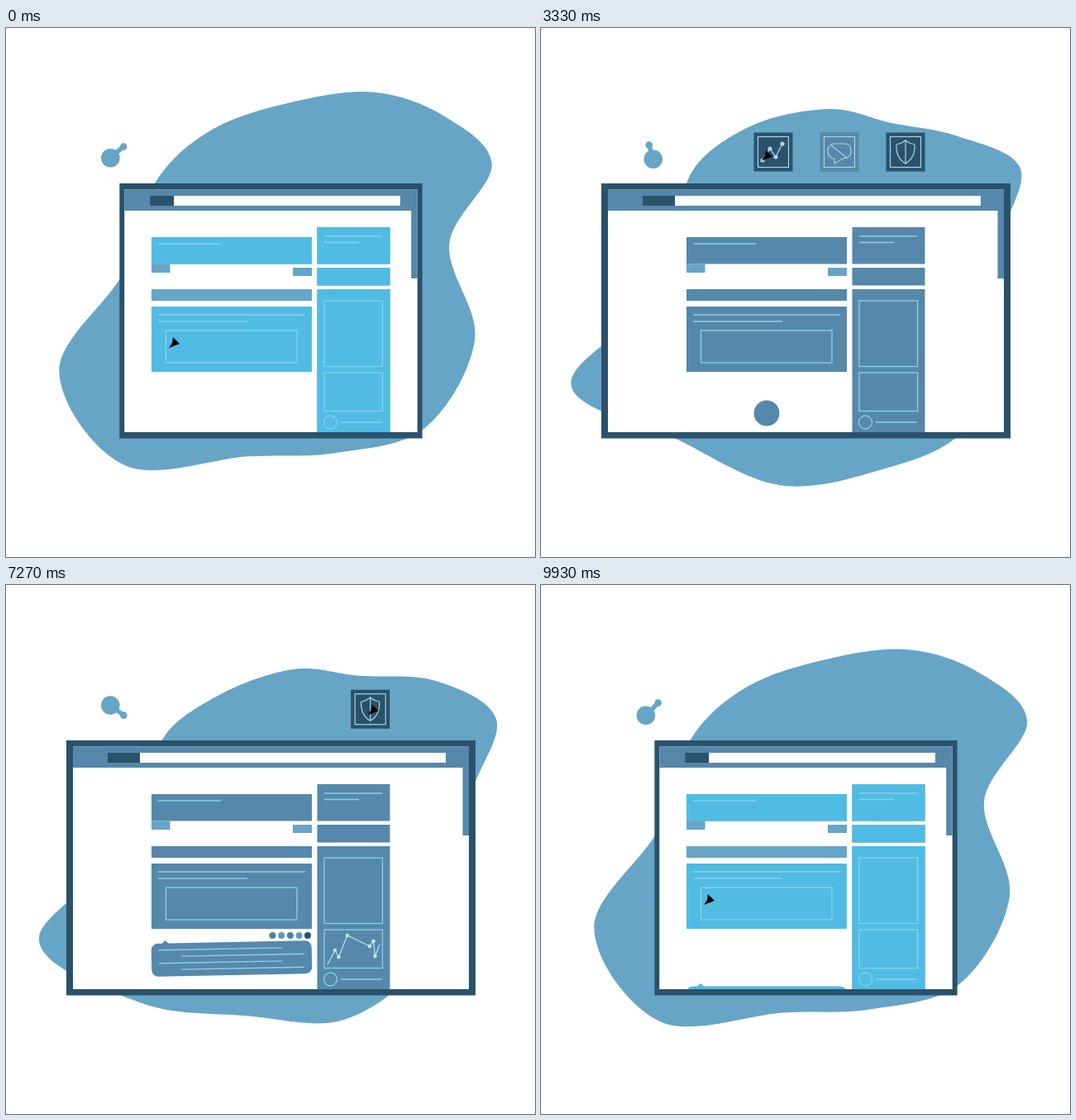
Animation of 640 by 640 pixels, one loop 9.99 s. Source, as an HTML page with a canvas:

```html
<!DOCTYPE html>
<html lang="en">
<head>
<meta charset="utf-8">
<title>Page builder</title>
<style>
html, body { margin: 0; height: 100%; overflow: hidden; background: #fff; }
canvas { display: block; width: 100vw; height: 100vh; }
</style>
</head>
<body>
<canvas id="stage" width="640" height="640"></canvas>
<script>
const g = document.getElementById('stage').getContext('2d');
const LOOP = 9990;
const BLOB = '#66a5c6', DARK = '#2a526b', MID = '#5588aa', BRIGHT = '#50bce3';
const LINE = '#8ccfe6', GLYPH = '#a9d4e6';
let t = 0;

const lerp = (a, b, u) => a + (b - a) * u;
const mix = (a, b, u) => a.map((v, i) => lerp(v, b[i], u));
const ramp = (from, to) => {
  const u = Math.min(1, Math.max(0, (t - from) / (to - from)));
  return u * u * (3 - 2 * u);
};

// Blob radii along a few directions, and droplet angle and reach, at each pose time
const TIMES = [0, 1330, 3330, 5670, 7270, 8530];
const ANGLES = [-26, -9, 18, 45, 70, 97, 127, 155, 180, 218, 248, 278, 300, 318];
const RADII = [
  [298, 219, 260, 265, 232, 224, 292, 282, 178, 177, 187, 209, 252, 283],
  [284, 240, 252, 290, 260, 246, 290, 291, 180, 189, 179, 194, 243, 257],
  [289, 240, 245, 270, 255, 259, 254, 313, 140, 181, 189, 200, 209, 247],
  [291, 240, 245, 258, 243, 249, 284, 290, 190, 170, 157, 177, 224, 259],
  [304, 245, 245, 245, 246, 227, 262, 309, 140, 169, 174, 196, 215, 269],
  [306, 225, 240, 235, 224, 208, 250, 294, 180, 173, 172, 198, 217, 276]
];
const DROPLET = [[-41, 21], [-75, 0], [-106, 18], [-196, 20], [-323, 20], [-274, 13]];

// Smooth cyclic interpolation between poses
function pose(rows) {
  const n = TIMES.length;
  const i = TIMES.filter(k => k <= t).length - 1;
  const time = k => TIMES[(k + n) % n] + LOOP * Math.floor(k / n);
  const row = k => rows[(k + n) % n];
  const span = time(i + 1) - time(i), u = (t - time(i)) / span;
  return row(i).map((a, j) => {
    const slope = k => (row(k + 1)[j] - row(k - 1)[j]) / (time(k + 1) - time(k - 1)) * span;
    const s = u * u * (3 - 2 * u);
    return lerp(a, row(i + 1)[j], s) + slope(i) * u * (1 - u) ** 2 - slope(i + 1) * u * u * (1 - u);
  });
}
function polar(x, y, r, degrees) {
  const a = degrees * Math.PI / 180;
  return [x + r * Math.cos(a), y + r * Math.sin(a)];
}

function rect(x, y, w, h, color) {
  g.fillStyle = color;
  g.fillRect(x, y, w, h);
}
function disc(x, y, r, color) {
  g.fillStyle = color;
  g.beginPath();
  g.arc(x, y, r, 0, 7);
  g.fill();
}
function stroke(points, color = LINE, width = 1.3) {
  g.strokeStyle = color;
  g.lineWidth = width;
  g.beginPath();
  points.forEach(p => g.lineTo(...p));
  g.stroke();
}
const rule = (x1, x2, y) => stroke([[x1, y], [x2, y]]);
function frame(x, y, w, h) {
  g.strokeStyle = LINE;
  g.lineWidth = 1.3;
  g.strokeRect(x, y, w, h);
}

function drawBlob() {
  const p = pose(RADII).map((r, i) => polar(320, 296, r, ANGLES[i]));
  const at = i => p[(i + p.length) % p.length];
  const handle = (i, side) => at(i).map((v, k) => v + side * (at(i + 1)[k] - at(i - 1)[k]) / 6);
  g.fillStyle = BLOB;
  g.beginPath();
  g.moveTo(...p[0]);
  p.forEach((_, i) => g.bezierCurveTo(...handle(i, 1), ...handle(i + 1, -1), ...at(i + 1)));
  g.fill();

  const [angle, reach] = pose(DROPLET);
  const ball = polar(133.5, 151, -0.45 * reach, angle);
  const tail = polar(133.5, 151, 0.55 * reach, angle);
  disc(...ball, 11.3, BLOB);
  disc(...tail, 4.3, BLOB);
  stroke([ball, tail], BLOB, 5.5);
}

const MIDDLE = 320.5;
const windowScale = () => lerp(0.74, 1, ramp(400, 1900) - ramp(8950, 9750));

function drawWindow() {
  const scale = windowScale();
  g.save();
  g.translate(MIDDLE, 0);
  g.scale(scale, 1);
  rect(-247.5, 188, 495, 308.5, DARK);
  rect(-239.5, 195.5, 479, 293.5, '#fff');
  rect(-239.5, 195.5, 479, 25.5, MID);
  rect(-197.5, 203, 39, 12, DARK);
  rect(-158.5, 203, 370, 12, '#fff');
  g.restore();
  rect(MIDDLE + 239.5 * scale - 7.5, 221, 7.5, 82, MID);
}

// Each icon is grabbed at its slot and dragged to a point; hold is the cursor offset
const REST = [203, 381];
const ICONS = [
  { grab: 1100, drop: 2300, to: [282, 477], hold: [9, 11], bow: -30 },
  { grab: 3450, drop: 4700, to: [137, 417], hold: [-8, 4], bow: 0 },
  { grab: 5350, drop: 6320, to: [273, 458], hold: [0, 5], bow: 36 },
  { grab: 7250, drop: 8400, to: [163, 381], hold: [3, 1], bow: 0 }
].map((icon, i) => ({ ...icon, slot: [201 + 80 * i, 150] }));

function cursorAt() {
  const done = ICONS.filter(icon => t >= icon.drop).length;
  const last = ICONS[done - 1] || { drop: 200, to: REST }, next = ICONS[done];
  if (!next) return mix(last.to, REST, ramp(last.drop + 100, last.drop + 500));
  const { grab, drop, slot, hold, to, bow } = next;
  const pick = slot.map((v, i) => v + hold[i]);
  if (t < grab) return mix(last.to, pick, ramp(last.drop + 100, grab - 100));
  const u = ramp(grab, drop), [x, y] = mix(pick, to, u);
  return [x + bow * 4 * u * (1 - u), y];
}
function drawCursor() {
  const [x, y] = cursorAt();
  g.fillStyle = '#000';
  g.beginPath();
  [[-1, -7], [7, 1], [-6, 6], [-2, 0]].forEach(([dx, dy]) => g.lineTo(x + dx, y + dy));
  g.fill();
}

const PAGES = new Path2D('M-11-14h6l4 4v12h-10zM-4-9h6l4 4v12h-10zM4-3h6l4 4v12h-10z');
const CHAT = new Path2D('M-8 8Q-15 5-14-3Q-13-10-5-10H6Q14-10 14-1Q14 8 4 8L-6 14V8ZM-10-8L9 7');
const SHIELD = new Path2D('M0-14Q5-10 11-9Q12 7 0 14Q-12 7-11-9Q-5-10 0-14V14');
const GLYPHS = [
  () => g.stroke(PAGES),
  () => {
    const p = [[-13, 10], [-4, -4], [3, 6], [11, -10]];
    stroke(p, GLYPH);
    p.forEach(([x, y]) => disc(x, y, 2.6, GLYPH));
  },
  () => g.stroke(CHAT),
  () => g.stroke(SHIELD)
];
function tile(kind, [x, y], scale, tilt = 0) {
  if (scale < 0.01) return;
  g.save();
  g.translate(x, y);
  g.rotate(tilt);
  g.scale(scale, scale);
  rect(-23.5, -23.5, 47, 47, kind % 2 ? DARK : MID);
  g.strokeStyle = GLYPH;
  g.lineWidth = 1.2;
  g.strokeRect(-18.5, -18.5, 37, 37);
  GLYPHS[kind]();
  g.restore();
}
function drawIcon(kind) {
  const { slot, grab, drop, to, hold } = ICONS[kind];
  const leave = kind === 3 ? drop + 500 : drop;
  if (kind === 1 && t >= drop) return; // carried on by the streak
  const hand = t < leave ? cursorAt() : kind === 3 ? REST : to;
  const place = t < grab ? slot : hand.map((v, i) => v - hold[i]);
  const scale = ramp(500 + kind * 90, 850 + kind * 90) - ramp(leave, leave + 300);
  tile(kind, place, scale, kind ? 0 : -0.09 * ramp(grab, grab + 200));
}

// A panel turns bright along a wipe and fades back when the loop restarts
function panel(x, y, w, h, start, hue = BRIGHT) {
  const early = t < 1000;
  rect(x, y, w, h, MID);
  g.globalAlpha = early ? 1 - ramp(300, 900) : 1;
  rect(x, y, early ? w : w * ramp(start, start + 300), h, hue);
  g.globalAlpha = 1;
}
function formLines(y) {
  rule(184, 362, y + 10);
  rule(184, 292, y + 18);
  frame(193.5, y + 29, 158.5, 39);
}

const streak = u => [145 + 220 * u, 424 - 11 * (1 - u) ** 4 + 2 * Math.sin(Math.PI * u)];

function drawStreakAndDots() {
  g.save();
  g.translate(0, -14 * ramp(9300, 9960));
  for (let i = 0; i < 4; i++) {
    const y = lerp(410, 424, ramp(5600 + i * 120, 5950 + i * 120));
    if (t > 5600) disc(322.5 + i * 10.7, y, 4, i % 2 ? '#5f9bbf' : '#4f80a2');
  }
  if (t >= 4700) {
    const head = ramp(5300, 6100), tail = ramp(5670, 6250);
    g.lineCap = g.lineJoin = 'round';
    stroke(Array.from({ length: 21 }, (_, i) => streak(lerp(tail, head, i / 20))),
      DARK, lerp(20, 8, ramp(5750, 6250)) * ramp(4600, 5000));
    g.lineCap = 'butt';
    g.lineJoin = 'miter';
    tile(1, streak(head), lerp(1, 0.38, ramp(4700, 5200)) * (1 - ramp(5800, 6050)), 0.1);
  }
  g.restore();
}

// A disc that grows into a second form, then slides out below
function drawCopy() {
  if (t < 2350 || t > 6900) return;
  const u = ramp(3350, 3950), size = ramp(2350, 2650);
  const [hw, hh, cy, r] = mix([15.5, 15.5, 466, 15.5], [97, 39.5, 481.5, 0], u);
  g.save();
  g.translate(273, cy + 60 * ramp(6330, 6800));
  g.scale(size, size);
  g.fillStyle = MID;
  g.beginPath();
  g.roundRect(-hw, -hh, 2 * hw, 2 * hh, r);
  g.fill();
  g.globalAlpha = ramp(3750, 4050);
  g.translate(-273, 0);
  formLines(-39.5);
  g.restore();
}

function drawBubble() {
  const grow = ramp(6400, 6950);
  if (!grow) return;
  g.save();
  g.translate(273, 452 + 60 * ramp(9300, LOOP + 100));
  g.rotate(-0.02 * (1 - ramp(7250, 7700)));
  g.scale(grow, grow);
  const shape = new Path2D('M-85-19L-80-23.5L-75-19Z');
  shape.roundRect(-97, -20, 194, 40, 8);
  g.fillStyle = MID;
  g.fill(shape);
  g.save();
  g.clip(shape);
  rect(-97, -24, 194, 44 * ramp(8360, 8660), BRIGHT);
  g.restore();
  for (let i = 0; i < 4; i++) {
    const shift = i % 2 * 27;
    rule(shift - 88, shift + 61, 8 * i - 12);
  }
  g.restore();
}

// The chart is traced point by point
const GRAPH = [[389, 459], [398, 442], [402.5, 450], [413, 424], [440, 437], [444.5, 431], [446.5, 449], [452, 435]];
function drawGraph() {
  let left = 127 * Math.min(1, Math.max(0, (t - 5300) / 840)) * (1 - ramp(9000, 9600));
  const drawn = [GRAPH[0]];
  for (let i = 1; i < GRAPH.length && left > 0; i++) {
    const a = GRAPH[i - 1], b = GRAPH[i];
    const length = Math.hypot(b[0] - a[0], b[1] - a[1]), u = Math.min(1, left / length);
    drawn.push(mix(a, b, u));
    if (u === 1 && i < GRAPH.length - 1) disc(...b, 2.2, '#d8f0f8');
    left -= length;
  }
  stroke(drawn, '#b5dfee');
}

function drawContent() {
  const half = 239.5 * windowScale();
  g.save();
  g.beginPath();
  g.rect(MIDDLE - half, 221, 2 * half, 268);
  g.clip();

  drawCopy();
  drawStreakAndDots();
  drawBubble();

  panel(176, 253, 194, 32.5, 8640);
  rule(184, 260, 261);
  rect(176, 285.5, 22.5, 10.5, BLOB);
  rect(347, 290, 23, 10, BLOB);
  panel(176, 316, 194, 14, 8600, BLOB);
  panel(176, 337, 194, 79, 8420);
  formLines(337);

  panel(376.5, 241, 88, 44.5, 8800);
  rule(385, 455, 252);
  rule(385, 427, 259.5);
  panel(376.5, 290, 88, 21.5, 8800);
  panel(376.5, 316, 88, 174, 8750);
  frame(385, 330, 70.5, 79.5);
  frame(385, 417, 70.5, 46.5);
  rule(405, 455, 477);
  g.beginPath();
  g.arc(392.5, 477, 8, 0, 7);
  g.stroke();
  drawGraph();
  g.restore();
}

function draw(now) {
  t = now % LOOP;
  const tucked = t > 8380;
  rect(0, 0, 640, 640, '#fff');
  drawBlob();
  drawWindow();
  if (tucked) drawIcon(3);
  drawContent();
  [0, 1, 2].forEach(drawIcon);
  if (!tucked) drawIcon(3);
  drawCursor();
}

const start = performance.now();
(function tick() {
  draw(performance.now() - start);
  requestAnimationFrame(tick);
})();
</script>
</body>
</html>
```
